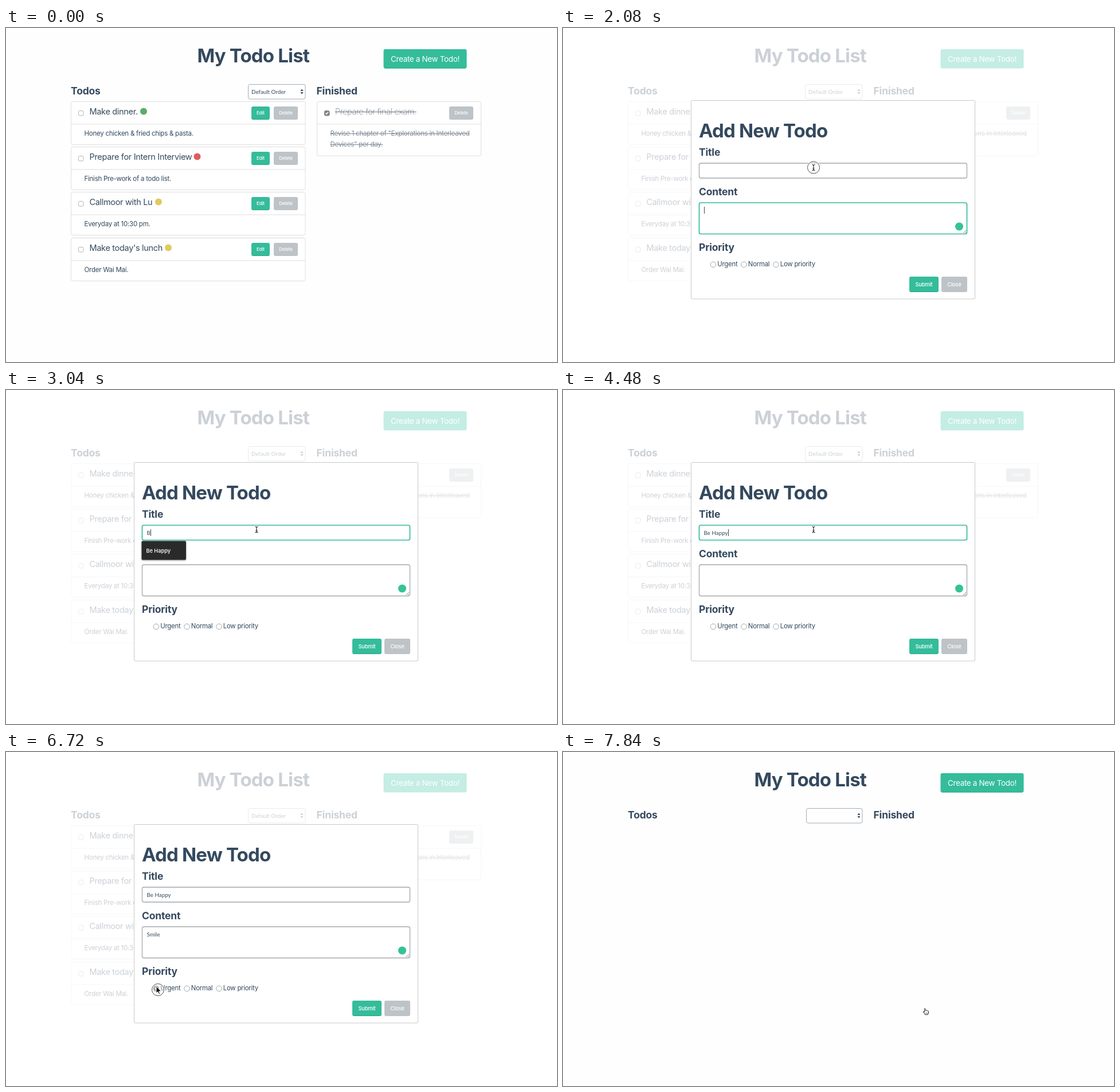
An HTML page with a canvas that plays this animation: 961 by 583 pixels, repeating every 8 s.

```html
<!DOCTYPE html>
<html lang="en">
<head>
<meta charset="utf-8">
<title>My Todo List</title>
<style>
html, body { margin: 0; width: 100%; height: 100%; overflow: hidden; background: #fefefe; }
canvas { display: block; }
</style>
</head>
<body>
<canvas id="stage" width="961" height="583"></canvas>
<script>
const ctx = document.getElementById('stage').getContext('2d');
const LOOP = 8000, STEP = 160;
const INK = '#34495e', GREEN = '#34bc9b', DEEP_GREEN = '#14b993', TEAL = '#38b8b8', GRAY = '#bdc3c7';
const RED = '#e05c5c', YELLOW = '#dfcb60', LEAF = '#5aad67';
const SANS = 'Inter, "Open Sans", sans-serif', LATO = 'Lato, sans-serif';

const todos = [
  { title: 'Make dinner.', body: 'Honey chicken & fried chips & pasta.', dotX: 240, color: LEAF },
  { title: 'Prepare for Intern Interview', body: 'Finish Pre-work of a todo list.', dotX: 333.5, color: RED },
  { title: 'Callmoor with Lu', body: 'Everyday at 10:30 pm.', dotX: 266, color: YELLOW },
  { title: "Make today's lunch", body: 'Order Wai Mai.', dotX: 283, color: YELLOW },
  { title: 'Be Happy', body: 'Smile', dotX: 219, color: RED }
];

// Pointer moves: start, end, from, to, shape while moving, shape at rest
const moves = [
  [160, 960, [442, 218], [698, 60.5], 'arrow', 'hand'],
  [1280, 1920, [698, 60.5], [437, 243.5], 'arrow', 'beam'],
  [4480, 4960, [437, 243.5], [414, 336], 'beam', 'beam'],
  [5920, 6560, [414, 336], [265, 415], 'arrow', 'arrow'],
  [6720, 7360, [265, 415], [633, 453], 'arrow', 'hand']
];
const clicks = [[1120, 1280], [2080, 2240], [4960, 5120], [6720, 6880], [7520, 7680]];
const titleKeys = [3040, 3200, 3360, 3680, 3840, 3840, 4000, 4320];
const contentKeys = [5120, 5280, 5600, 5760, 5920];

const within = (t, a, b) => t >= a && t < b;
const typed = (word, keys, t) => word.slice(0, keys.filter(k => k <= t).length);
const ease = p => p * p * (3 - 2 * p);

function text(str, x, y, size, { weight = 400, color = INK, family = SANS, track = -0.022, align = 'left' } = {}) {
  ctx.font = `${weight} ${size}px ${family}`;
  ctx.letterSpacing = `${family === LATO ? 0 : track * size}px`;
  ctx.textAlign = align;
  ctx.fillStyle = color;
  ctx.fillText(str, x, y);
  return ctx.measureText(str).width;
}

const headline = (str, x, y) => text(str, x, y, 33, { weight: 700, track: -0.025 });
const heading = (str, x, y) => text(str, x, y, 17.5, { weight: 700, track: -0.01 });

function paint(fill, stroke, line) {
  if (fill) { ctx.fillStyle = fill; ctx.fill(); }
  if (stroke) { ctx.strokeStyle = stroke; ctx.lineWidth = line; ctx.stroke(); }
}

function box(x, y, w, h, r, fill, stroke, line = 1) {
  ctx.beginPath();
  ctx.roundRect(x, y, w, h, r);
  paint(fill, stroke, line);
}

function disc(x, y, r, fill, stroke, line = 1) {
  ctx.beginPath();
  ctx.arc(x, y, r, 0, Math.PI * 2);
  paint(fill, stroke, line);
}

function path(points, { fill, stroke, line = 1, close = false }) {
  ctx.beginPath();
  points.forEach(([x, y]) => ctx.lineTo(x, y));
  if (close) ctx.closePath();
  paint(fill, stroke, line);
}

function strike(str, x, y, size, options) {
  const width = text(str, x, y, size, options);
  ctx.fillStyle = options.color;
  ctx.fillRect(x, Math.round(y - size * 0.35), width, 1);
}

function button(label, x, y, w, h, size, { fill = GREEN, weight = 500, ring = false } = {}) {
  box(x, y, w, h, 3, fill);
  if (fill === GREEN) {
    ctx.fillStyle = '#2ba587';
    ctx.fillRect(x + 2, y + h - 1, w - 4, 1);
  }
  if (ring) box(x - 0.5, y - 0.5, w + 1, h + 1, 4, null, 'rgba(110,178,240,.85)', 2.5);
  text(label, x + w / 2, y + h / 2 + size * 0.36, size, { weight, color: '#fff', align: 'center' });
}

function checkbox(x, y, checked) {
  box(x - 4, y - 4, 8.5, 8.5, 2, checked ? '#858585' : '#fff', checked ? '#777' : '#b3b3b3');
  if (checked) path([[x - 2, y], [x - 0.5, y + 2], [x + 2.5, y - 2]], { stroke: '#fff', line: 1.3 });
}

function cardFrame(x, y, w, h) {
  box(x, y, w, h, 3, '#fff', '#dedede');
  ctx.fillStyle = '#dedede';
  ctx.fillRect(x, y + 39, w, 1);
}

function todoCard({ title, body, dotX, color }, i) {
  const y = Math.round(128 + 79.2 * i) + 0.5;
  cardFrame(113.5, y, 408.5, 75);
  checkbox(130.5, y + 20, false);
  text(title, 145.5, y + 22.5, 14.5);
  disc(dotX, y + 17, 6, color);
  button('Edit', 428, y + 8.5, 32, 23, 8);
  button('Delete', 467, y + 8.5, 42, 23, 8, { fill: GRAY });
  text(body, 136.5, y + 59.5, 11.5);
}

function finishedCard() {
  cardFrame(542.5, 128.5, 286, 94.5);
  checkbox(559.5, 148.5, true);
  strike('Prepare for final exam.', 574, 151, 14.5, { weight: 200, color: '#66727e' });
  button('Delete', 773, 137, 42, 23, 8, { fill: GRAY });
  const faded = { color: '#7f8a94' };
  strike('Revise 1 chapter of "Explorations in Interleaved', 565.5, 188, 11.5, faded);
  strike('Devices" per day.', 565.5, 207, 11.5, faded);
}

function orderSelect(loaded) {
  const x = loaded ? 422.5 : 424.5;
  box(x, 98.5, 522 - x, 25.5, 3, '#fff', '#a3acb5');
  if (loaded) text('Default Order', 428, 114.5, 9.8, { family: LATO });
  path([[513.5, 110], [516, 106.5], [518.5, 110]], { fill: INK });
  path([[513.5, 112], [516, 115.5], [518.5, 112]], { fill: INK });
}

function page(t, modalOpen) {
  const loaded = t < 7840;
  const pressed = within(t, 1120, 1280);
  const fill = pressed ? '#3dbcb5' : modalOpen ? DEEP_GREEN : GREEN;
  headline('My Todo List', 333.5, 60);
  button('Create a New Todo!', 658.5, 37, 145, 33.5, 13.4,
    { weight: 400, fill, ring: pressed || within(t, 7680, 7840) });
  heading('Todos', 113, 115.5);
  heading('Finished', 541.5, 115.5);
  orderSelect(loaded);
  if (!loaded) return;
  todos.slice(0, t < 7680 ? 4 : 5).forEach(todoCard);
  finishedCard();
}

function field(y, h, value, focused, caret) {
  box(237.5, y, 467, h, 3, '#fff', focused ? GREEN : '#a3a9ae', focused ? 1.7 : 1.3);
  const base = y + 16.5;
  const width = text(value, 245.5, base, 9.8, { family: LATO });
  if (focused && caret) {
    ctx.fillStyle = '#444';
    ctx.fillRect(Math.round(245.5 + width), base - 9.5, 1, 12);
  }
}

function radio(x, label, checked) {
  disc(x, 413, 4.8, checked ? '#868686' : '#fff', checked ? '#777' : '#a6a6a6');
  if (checked) disc(x, 413, 2, '#fff');
  text(label, x + 7.3, 416, 11.4);
}

function modal(t) {
  ctx.fillStyle = 'rgba(255,255,255,.75)';
  ctx.fillRect(0, 0, 961, 583);
  box(223.5, 126.5, 495, 346.5, 2, '#fff', '#c9c9c9');
  headline('Add New Todo', 237, 191);
  heading('Title', 237, 222.5);
  heading('Content', 237, 291.5);
  heading('Priority', 237, 389);

  field(236, 26, typed('Be Happy', titleKeys, t), within(t, 2400, 4960), !within(t, 2720, 3040));
  field(305, 54.5, typed('Smile', contentKeys, t), t < 2240 || within(t, 4960, 6720), true);
  path([[698, 358], [703, 353]], { stroke: '#888' });
  path([[701, 358], [703, 356]], { stroke: '#888' });
  disc(691, 346.5, 7, '#35c296');

  radio(262, 'Urgent', t >= 6720);
  radio(315.5, 'Normal');
  radio(371.5, 'Low priority');

  const pressed = within(t, 7520, 7680);
  button('Submit', 604, 434, 51, 27, 9.4, { fill: pressed ? TEAL : GREEN, ring: pressed });
  button('Close', 660, 434, 45, 27, 9.4, { fill: GRAY });

  if (within(t, 3040, 4480)) {
    ctx.save();
    ctx.shadowColor = 'rgba(0,0,0,.4)';
    ctx.shadowBlur = 3;
    ctx.shadowOffsetY = 1;
    box(236.5, 263.5, 77.5, 33, 2, '#2a2a2a');
    ctx.restore();
    text('Be Happy', 244.5, 284, 9.2, { weight: 600, color: '#eee', track: 0 });
  }
}

const shapes = {
  arrow() {
    path([[-3, -6], [-3, 6], [-0.3, 3.6], [1.6, 7.6], [3.6, 6.7], [1.8, 3], [5.4, 2.6]],
      { fill: '#111', stroke: '#fff', close: true });
  },
  beam() {
    ctx.beginPath();
    ctx.moveTo(-2.5, -5);
    ctx.quadraticCurveTo(0, -5, 0, -3);
    ctx.lineTo(0, 3);
    ctx.quadraticCurveTo(0, 5, -2.5, 5);
    ctx.moveTo(2.5, -5);
    ctx.quadraticCurveTo(0, -5, 0, -3);
    ctx.moveTo(0, 3);
    ctx.quadraticCurveTo(0, 5, 2.5, 5);
    ctx.moveTo(-1.5, 1.5);
    ctx.lineTo(1.5, 1.5);
    paint(null, '#222', 1.1);
  },
  hand() {
    ctx.lineJoin = 'round';
    path([[-2.8, -4.6], [-1.8, -5.5], [-0.8, -4.6], [-0.4, -1.6], [1.2, -2], [2.2, -1.3], [3.6, -1.2],
      [4.6, 0], [4.4, 3], [3.2, 5.4], [-1.5, 5.4], [-3, 2.8], [-4.7, 0.8], [-4.2, -0.2], [-2.2, 0.9]],
      { fill: '#fff', stroke: '#222', close: true });
    for (const x of [-0.4, 1.2, 2.8]) path([[x, 2], [x, 4]], { stroke: '#444', line: 0.7 });
  }
};

function pointer(t) {
  const move = moves.filter(m => m[0] <= t).pop();
  if (!move) return;
  const [start, end, from, to, moving, resting] = move;
  const p = ease(Math.min(1, (t - start) / (end - start)));
  const [x, y] = from.map((v, i) => v + (to[i] - v) * p);
  ctx.save();
  ctx.translate(x, y);
  if (clicks.some(([a, b]) => within(t, a, b))) {
    disc(0, 0, 10.5, 'rgba(255,255,255,.3)', 'rgba(255,255,255,.8)', 3);
    disc(0, 0, 10.5, null, '#505050');
  }
  shapes[p < 1 ? moving : resting]();
  ctx.restore();
}

function draw() {
  const t = Math.floor(performance.now() % LOOP / STEP) * STEP;
  const modalOpen = within(t, 1280, 7680);
  ctx.fillStyle = '#fefefe';
  ctx.fillRect(0, 0, 961, 583);
  page(t, modalOpen);
  if (modalOpen) modal(t);
  pointer(t);
  requestAnimationFrame(draw);
}
draw();
</script>
</body>
</html>
```
